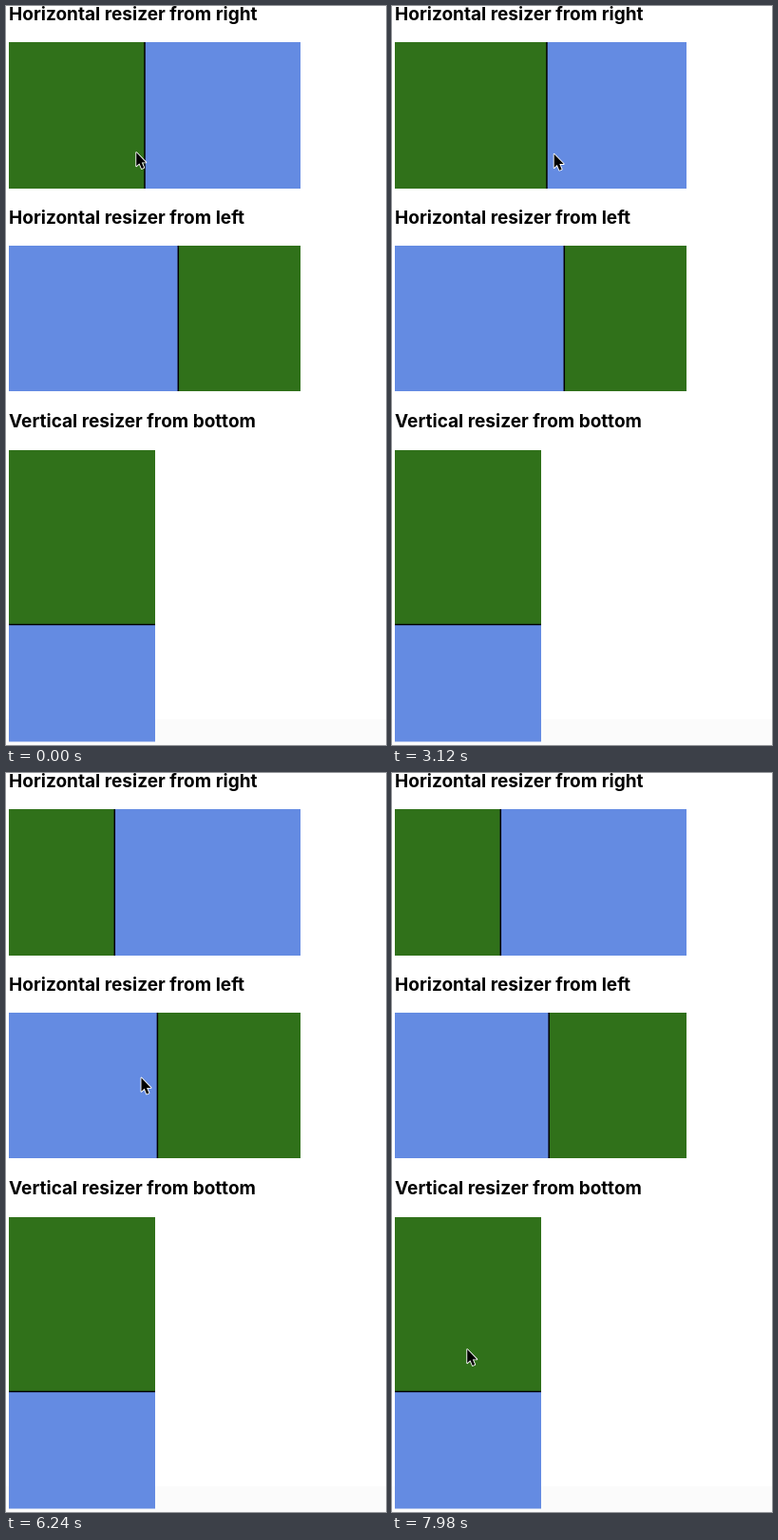
Animation of 400x777 px, one loop 8 s. Source, as an HTML page:

```html
<!DOCTYPE html>
<html lang="en">
<head>
<meta charset="utf-8">
<title>Resizers</title>
<style>
  html, body { margin: 0; width: 100%; height: 100%; overflow: hidden; background: #fff; }
  svg { display: block; width: 400px; height: 777px; }
  text { font: 700 19.05px Inter, "Open Sans", sans-serif; fill: #000; }
  .green { fill: #30711a; }
  .blue { fill: #648be2; }
  .cursor path { fill: #000; stroke: #fff; stroke-width: 2; stroke-linejoin: round; paint-order: stroke; }
</style>
</head>
<body>
<svg viewBox="0 0 400 777">
  <rect y="750" width="400" height="27" fill="#fbfbfb"/>
  <text x="3" y="14.5">Horizontal resizer from right</text>
  <text x="3" y="229.3">Horizontal resizer from left</text>
  <text x="3" y="443">Vertical resizer from bottom</text>

  <rect class="blue" x="3" y="38" width="307" height="154"/>
  <rect class="green" id="pane1" x="3" y="38" height="154"/>
  <rect id="bar1" y="38" height="154"/>

  <rect class="green" x="3" y="252" width="307" height="153"/>
  <rect class="blue" id="pane2" x="3" y="252" height="153"/>
  <rect id="bar2" y="252" height="153"/>

  <rect class="green" x="3" y="467" width="154" height="183"/>
  <rect class="blue" x="3" y="650" width="154" height="123.5"/>
  <rect x="3" y="649.7" width="154" height="1.4"/>

  <g class="cursor" id="arrow">
    <path transform="translate(.6 .2) scale(.89)" d="M.7 1V17L4.3 13.7L7 20L9.7 18.8L7 12.6H12Z"/>
  </g>
  <g class="cursor" id="resize">
    <path d="M-8 0L-3 -5V-1.6H3V-5L8 0L3 5V1.6H-3V5Z"/>
  </g>
</svg>
<script>
const LOOP = 8000, STEP = 60, LEFT = 3;
const $ = id => document.getElementById(id);
const clamp = (v, lo, hi) => Math.min(hi, Math.max(lo, v));
const easeOut = u => 1 - (1 - u) ** 2;

// Pointer glides: start, end, x, y
const glides = [
  [0, 180, 145, 155],
  [600, 840, 130, 159],
  [1440, 2160, 145, 155],
  [2280, 2400, 146, 156],
  // drag the first divider right, then left
  [2940, 3380, 182, 154],
  [3380, 3780, 119.2, 163],
  [3840, 3900, 114.3, 163],
  // approach the second, drag it left, then right
  [4080, 4920, 192, 309],
  [5220, 5880, 181.3, 320],
  [6120, 6500, 106, 319],
  [6500, 6960, 158.6, 323],
  [7080, 7380, 165.2, 323],
  [7560, 7980, 78, 605]
];

function pointer(t) {
  let x = 136, y = 153;
  for (const [from, to, toX, toY] of glides) {
    const u = easeOut(clamp((t - from) / (to - from), 0, 1));
    x += (toX - x) * u;
    y += (toY - y) * u;
  }
  return { x, y };
}

const dividers = [
  { pane: $("pane1"), bar: $("bar1"), drag: [2940, 3960], hover: [2340, 4140] },
  { pane: $("pane2"), bar: $("bar2"), drag: [6120, 7440], hover: [5880, 7620] }
];

function draw(time) {
  const t = Math.floor((time % LOOP) / STEP) * STEP;
  const { x, y } = pointer(t);
  let gripping = false;
  for (const { pane, bar, drag, hover } of dividers) {
    // The divider trails the pointer by one step
    const at = pointer(clamp(t - STEP, ...drag)).x;
    const hot = t >= hover[0] && t < hover[1] && Math.abs(x - at) < 4;
    const width = hot ? 3.1 : 1.5;
    pane.setAttribute("width", at - LEFT);
    bar.setAttribute("x", at - width / 2);
    bar.setAttribute("width", width);
    bar.setAttribute("fill", hot ? "#ec2224" : "#000");
    gripping = gripping || hot;
  }
  const place = `translate(${x} ${y})`;
  $("arrow").setAttribute("transform", place);
  $("resize").setAttribute("transform", place);
  $("arrow").style.display = gripping ? "none" : "";
  $("resize").style.display = gripping ? "" : "none";
}

const start = performance.now();
function tick() {
  draw(performance.now() - start);
  requestAnimationFrame(tick);
}
tick();
</script>
</body>
</html>
```
